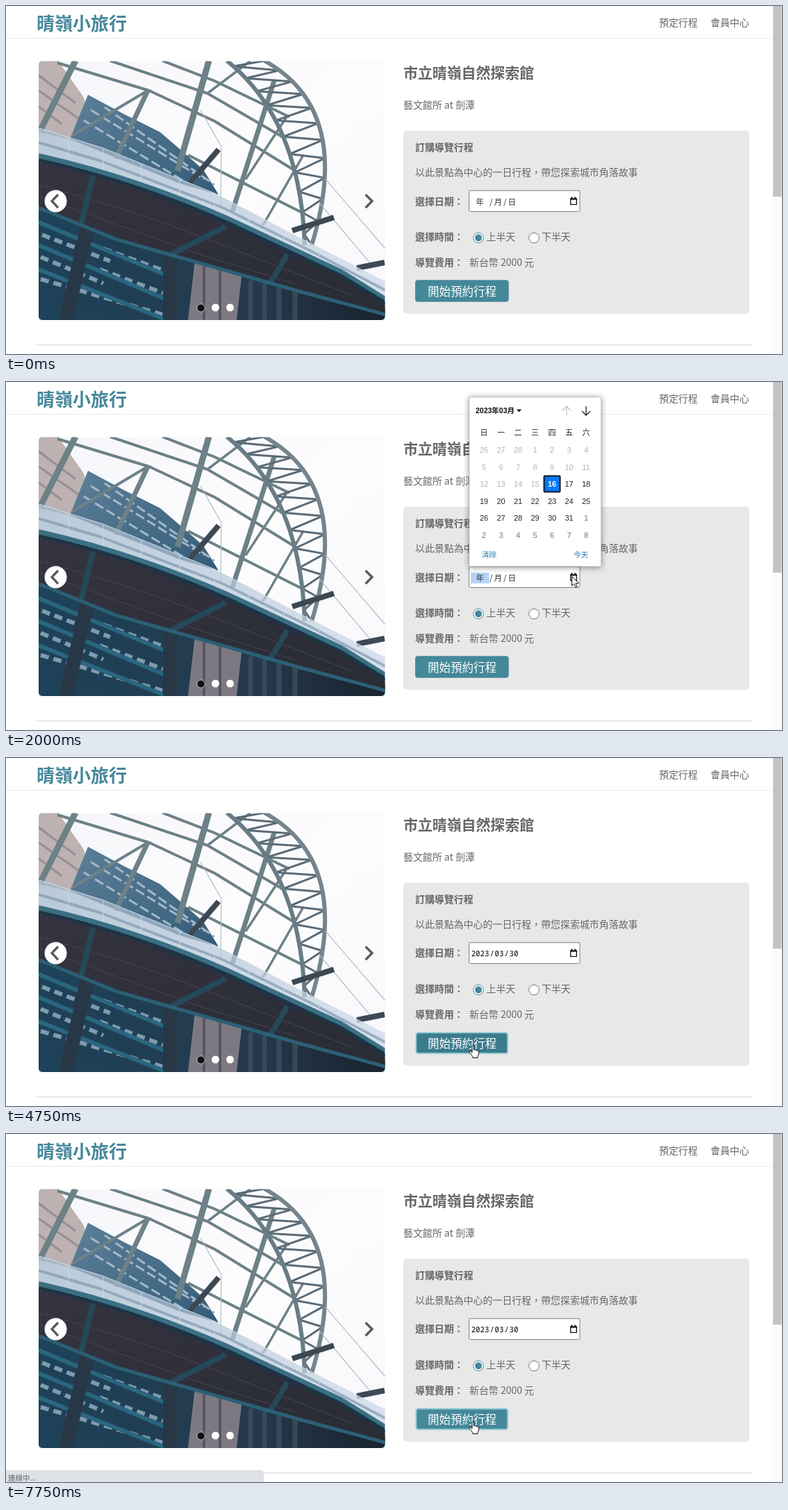
Recreate the animation shown at these times as an HTML page. Size 1117 px wide and 502 px high, loop 8000 ms.

```html
<!DOCTYPE html>
<html lang="zh-Hant">
<head>
<meta charset="utf-8">
<title>晴嶺小旅行</title>
<style>
html,body{margin:0;width:100%;height:100%;overflow:hidden;background:#fff}
svg{display:block;width:1117px;height:502px}
text{font:13.95px "Noto Sans CJK TC","Noto Sans CJK JP","Noto Sans CJK",sans-serif;fill:#666}
.b{font-weight:700}
.mid{text-anchor:middle}
#date text{font-size:11.5px;fill:#333}
#date .mono{font:10.7px "Noto Sans Mono","DejaVu Sans Mono",monospace;fill:#000}
#cal text{font-size:10.5px;fill:#222}
#cal .day{font:11px "Liberation Sans","Noto Sans CJK TC",sans-serif;text-anchor:middle}
#cal .off{fill:#b4b4b4}
#cal .next{fill:#757575}
#cal .today{fill:#fff;font-weight:700}
#cal .link{fill:#2a7ab0}
#cal>rect:first-child{filter:drop-shadow(0 1px 4px rgba(0,0,0,.45))}
#msg>.box{filter:drop-shadow(0 14px 30px rgba(0,0,0,.4))}
.line{fill:none;stroke-linejoin:round}
.tm{animation:8s step-end infinite}
#arrow{animation-name:arrow}
#hand,#hover{animation-name:hand}
#press{animation-name:press}
#ring{animation-name:ring}
#year{animation-name:year}
#empty{animation-name:empty}
#filled{animation-name:filled}
#label{animation-name:label}
#cal{animation-name:cal}
#pick{animation-name:pick}
#msg{animation-name:msg}
#status{animation-name:status}
@keyframes arrow{
0%{opacity:0;transform:translate(759px,220px)}
6.25%{opacity:1;transform:translate(759px,220px)}
12.5%{opacity:1;transform:translate(792px,261px)}
15.625%{opacity:1;transform:translate(812px,279px)}
18.75%{opacity:1;transform:translate(814px,280px)}
31.25%{opacity:1;transform:translate(800px,244px)}
34.375%{opacity:1;transform:translate(784px,205px)}
37.5%{opacity:1;transform:translate(787px,205px)}
46.875%{opacity:1;transform:translate(784px,211px)}
50%{opacity:1;transform:translate(755px,289px)}
53.125%{opacity:1;transform:translate(700px,365px)}
56.25%,100%{opacity:0;transform:translate(700px,365px)}
}
@keyframes hand{0%{opacity:0}56.25%,100%{opacity:1}}
@keyframes press{0%,62.5%,100%{opacity:0}59.375%{opacity:1}}
@keyframes ring{0%,25%,59.375%,100%{opacity:0}21.875%,43.75%{opacity:1}}
@keyframes year{0%,59.375%,100%{opacity:0}21.875%{opacity:1}}
@keyframes empty{0%{opacity:1}43.75%,100%{opacity:0}}
@keyframes filled{0%{opacity:0}43.75%,100%{opacity:1}}
@keyframes label{0%{transform:none}43.75%,100%{transform:translateY(-1px)}}
@keyframes cal{0%,43.75%,100%{opacity:0}25%{opacity:1}}
@keyframes pick{0%{opacity:0}34.375%,100%{opacity:1}}
@keyframes msg{0%,96.875%,100%{opacity:0}65.625%{opacity:1}}
@keyframes status{0%{opacity:0}96.875%,100%{opacity:1}}
</style>
</head>
<body>
<svg viewBox="0 0 1117 502">
<defs>
<clipPath id="frame"><rect x="47" y="79.500" width="498.500" height="373.500" rx="5"/></clipPath>
<linearGradient id="sky" x2="1" y2="1"><stop stop-color="#f6f6fa"/><stop offset=".5" stop-color="#fdfcfd"/><stop offset="1" stop-color="#f8f7fb"/></linearGradient>
<linearGradient id="facade" x2="1" y2="1"><stop stop-color="#5d8098"/><stop offset="1" stop-color="#335c79"/></linearGradient>
<linearGradient id="glass" x2="1" y2=".6"><stop stop-color="#9fb6ca"/><stop offset="1" stop-color="#c9d6e4"/></linearGradient>
<linearGradient id="deck" x2="1" y2=".5"><stop stop-color="#343440"/><stop offset="1" stop-color="#2a2c36"/></linearGradient>
<linearGradient id="low" x2="1"><stop stop-color="#1d425a"/><stop offset=".6" stop-color="#243a4c"/><stop offset="1" stop-color="#1a2230"/></linearGradient>
<linearGradient id="bar"><stop stop-color="#66aabb"/><stop offset="1" stop-color="#337788"/></linearGradient>
</defs>

<text class="b" x="44" y="34.500" style="font-size:26px;fill:#448899">晴嶺小旅行</text>
<text x="940" y="28.700">預定行程</text>
<text x="1014" y="28.700">會員中心</text>
<path d="M0 46.500H1104" stroke="#ececec"/>
<path d="M43 488.800H1075" stroke="#e4e4e4" stroke-width="1.500"/>
<rect x="1104" width="13" height="502" fill="#fbfbfb"/>
<rect x="1104" width="12.500" height="275" fill="#c4c4c4"/>

<g clip-path="url(#frame)">
<rect x="47" y="79" width="499" height="374" fill="url(#sky)"/>
<path d="M47 79H75L112 132 128 200 47 182Z" fill="#bdb2b1"/>
<path d="M47 100L100 140M47 122L108 165M47 145L80 170" stroke="#938f99" stroke-width="3"/>
<path d="M118 128L170 156 222 182 284 236 306 272 250 256 92 192Z" fill="url(#facade)"/>
<path d="M122 150L285 250M112 165L255 252M142 146L300 258" stroke="#a3b8c8" stroke-width="3" stroke-dasharray="14 5"/>
<g class="line" stroke="#6d8187">
<path d="M100 79L50 178M292 79L247 238" stroke-width="9"/>
<path d="M205 120L158 220M386 108L326 296" stroke-width="7"/>
<path d="M204 122L95 187M74 82L206 122 300 166 420 240M150 79L290 126 400 190M225 79L300 108 408 160M262 215L430 300" stroke-width="4"/>
<path d="M352 79L290 126M404 160L345 250M428 215L370 316" stroke-width="3.500"/>
</g>
<path id="truss" class="line" stroke="#5c6b76" stroke-width="3"/>
<path class="line" d="M318 79Q424 165 430 345" stroke="#687c85" stroke-width="6"/>
<path class="line" d="M372 79Q500 150 440 345" stroke="#75848d" stroke-width="6"/>
<path d="M460 250L546 350M452 285L525 372M310 203L309 290M310 203L280 150" class="line" stroke="#b4bac1" stroke-width="1.200"/>
<path d="M306 207L264 256M412 324L472 305M505 378L545 370" stroke="#3b4955" stroke-width="8"/>

<path d="M47 275L546 435V453H47Z" fill="url(#low)"/>
<path d="M52 330L150 368M50 362L140 400M50 394L225 445M140 350L228 382M135 380L226 414" stroke="#7f9cac" stroke-width="6" stroke-dasharray="12 7"/>
<path d="M47 312L235 390M47 345L235 425M47 380L232 453" stroke="#2a6680" stroke-width="6"/>
<path d="M272 365L340 382 332 453H262Z" fill="#7c7982"/>
<path d="M285 373V453M308 378V453" stroke="#565862" stroke-width="4"/>
<path d="M122 300L86 453M236 350V453" stroke="#283846" stroke-width="20"/>
<path d="M352 395V453M372 400V453M393 405V453M416 410V453" stroke="#36495a" stroke-width="7"/>
<path d="M47 224Q200 258 320 313L490 394 546 428V444L420 410 290 372 160 335 47 289Z" fill="url(#deck)"/>
<path d="M47 258Q190 296 310 344L500 418M47 275L290 362 420 402" class="line" stroke="#47464f"/>
<path d="M125 246L108 314M316 318L238 358M405 358L380 400" stroke="#26495a" stroke-width="8"/>
<path d="M47 291L160 337 290 374 420 411 546 445" class="line" stroke="#2b6076" stroke-width="5"/>
<path d="M47 176L140 205 300 270 420 333 546 398V420L480 382 320 306 130 240 47 214Z" fill="url(#glass)" opacity=".72"/>
<path d="M47 197L135 223 310 290 440 354 546 410" class="line" stroke="#7390a8" stroke-width="4" opacity=".6"/>
<path d="M47 176L140 205 300 270 420 333 546 398" class="line" stroke="#d3dee8"/>
<path d="M90 190V226M140 206V242M195 228V262M250 250V282M300 270V300M350 297V322M400 323V345M450 350V368" stroke="#ccd8e2"/>
<path d="M47 216Q185 247 320 307L482 383 546 423" class="line" stroke="#3b6f83" stroke-width="7"/>
<path d="M47 222Q185 253 320 313L482 389 546 428" class="line" stroke="#1b3546" stroke-width="5"/>
</g>
<circle cx="71.500" cy="281.500" r="16" fill="#fff"/>
<path d="M75 272L66 281.500 75 291M517.500 272L527 281.500 517.500 291" fill="none" stroke="#5c5c5c" stroke-width="3.400"/>
<circle cx="280.500" cy="435.500" r="5.700" fill="#111" stroke="#cfd8dc"/>
<circle cx="301.500" cy="435" r="5.500" fill="#fff"/>
<circle cx="322.500" cy="435" r="5.500" fill="#fff"/>

<text class="b" x="572" y="103.500" style="font-size:20.9px">市立晴嶺自然探索館</text>
<text x="572" y="147.700">藝文館所 at 劍潭</text>
<rect x="572" y="180" width="498" height="264" rx="5" fill="#e8e8e8"/>
<text class="b" x="589" y="208.700">訂購導覽行程</text>
<text x="589" y="245">以此景點為中心的一日行程，帶您探索城市角落故事</text>
<text id="label" class="b tm" x="589" y="286.700">選擇日期：</text>
<text class="b" x="589" y="338.300">選擇時間：</text>
<text class="b" x="589" y="375">導覽費用：</text>
<text x="667" y="375">新台幣 2000 元</text>
<circle cx="680" cy="334.500" r="7.300" fill="#fff" stroke="#448899"/>
<circle cx="680" cy="334.500" r="5" fill="#448899"/>
<text x="691.500" y="338.300">上半天</text>
<circle cx="760" cy="334.500" r="7.300" fill="#fff" stroke="#767676"/>
<text x="771" y="338.300">下半天</text>

<g id="date">
<rect x="666.500" y="266.300" width="159.500" height="30.200" rx="2" fill="#fff" stroke="#808080"/>
<rect id="ring" class="tm" x="666.500" y="266.500" width="159.500" height="30" rx="2.500" fill="none" stroke="#101010" stroke-width="2"/>
<rect id="year" class="tm" x="669" y="275" width="26.500" height="15.500" fill="#b3d3fb"/>
<g id="empty" class="tm"><text x="676.500" y="286.500">年</text><text x="696" y="286.500">/</text><text x="702.500" y="286.500">月</text><text x="716" y="286.500">/</text><text x="722.500" y="286.500">日</text></g>
<g id="filled" class="tm"><text class="mono" x="669.700" y="285.800">2023</text><text class="mono" x="696.500" y="285.800">/</text><text class="mono" x="703.500" y="285.800">03</text><text class="mono" x="717.500" y="285.800">/</text><text class="mono" x="724.500" y="285.800">30</text></g>
<path d="M812.700 278V286.400H821.300V278Z" fill="none" stroke="#111" stroke-width="1.300"/>
<path d="M812 278.500H822M814.500 275.500V278M819.500 275.500V278" stroke="#111" stroke-width="2"/>
</g>

<rect x="589" y="395.300" width="134.700" height="31.500" rx="4" fill="#448899"/>
<g id="hover" class="tm"><rect x="588" y="394" width="137" height="34" fill="#e8e8e8"/><rect x="590.500" y="396.500" width="131.500" height="29.500" rx="3" fill="#448899" stroke="#8cc6d4" stroke-width="2"/></g>
<rect id="press" class="tm" x="591.500" y="397.500" width="129.500" height="27.500" rx="2" fill="#3b7c8c"/>
<text x="607" y="417.500" style="font-size:16.500px;fill:#fff;font-weight:350">開始預約行程</text>

<g id="cal" class="tm">
<rect x="667" y="22" width="189.500" height="244" fill="#fff" stroke="#c4c4c4" stroke-width=".8"/>
<text class="b" x="676" y="45" style="font-family:'Liberation Sans','Noto Sans CJK TC',sans-serif;fill:#111">2023年03月</text>
<path d="M735 39.500H742L738.500 43.500Z" fill="#111"/>
<path d="M807 48V35M801 41L807 35 813 41" fill="none" stroke="#bbb" stroke-width="1.200"/>
<path d="M835 35V48M829 42L835 48 841 42" fill="none" stroke="#222" stroke-width="1.300"/>
<rect x="774.500" y="135.500" width="23" height="23" rx="1" fill="#0a78f5" stroke="#101820" stroke-width="2"/>
<rect id="pick" class="tm" x="774.500" y="184.500" width="23" height="23" rx="1" fill="#b3d3fb" stroke="#4e6f98"/>
<g id="days"></g>
<text class="link" x="685" y="252.500">清除</text>
<text class="link" x="817" y="252.500">今天</text>
</g>

<g id="msg" class="tm">
<rect class="box" x="410" y="69" width="297" height="88" rx="5" fill="#fdfdfd"/>
<path d="M410 78V74Q410 69 415 69H702Q707 69 707 74V78Z" fill="url(#bar)"/>
<circle cx="514.500" cy="114.700" r="5.600" fill="#8edb12"/>
<text class="mid b" x="514.500" y="117.300" style="font-size:7px;fill:#5d9a12">V</text>
<text class="b" x="524" y="119.500" style="fill:#8edb12">成功預定行程</text>
</g>

<g id="status" class="tm">
<path d="M0 485H367Q371 485 371 489V502H0Z" fill="#dee1e6"/>
<text x="3" y="499.500" style="font-size:10.500px">連線中...</text>
</g>

<path id="arrow" class="tm" d="M.5 .5V14L3.700 11 6 16.300 8.200 15.300 6 10.300H10.500Z" fill="#fff" stroke="#111" stroke-linejoin="round"/>
<g id="hand" class="tm"><path transform="translate(666 414)" d="M5 11V2Q5 .6 6.200 .6T7.400 2V7Q9.500 6 9.900 7.500 11.600 6.800 12.100 8.200 14.200 7.700 14.400 9.700V13Q14.200 15.500 12.800 16.300V18.500H6V16.800Q3.500 14 1 10.600 .8 8.800 2.600 9Z" fill="#fff" stroke="#111" stroke-linejoin="round"/></g>
</svg>
<script>
const NS = 'http://www.w3.org/2000/svg';
const days = document.getElementById('days');

function cell(label, col, y, kind = '') {
  const t = document.createElementNS(NS, 'text');
  t.setAttribute('x', 688 + col * 24.5);
  t.setAttribute('y', y);
  t.setAttribute('class', 'day ' + kind);
  t.textContent = label;
  days.append(t);
}

[...'日一二三四五六'].forEach((d, i) => cell(d, i, 76.8));
for (let i = 0; i < 42; i++) {
  const n = i - 2;
  const label = n < 1 ? n + 28 : n > 31 ? n - 31 : n;
  const kind = n < 16 ? 'off' : n === 16 ? 'today' : n > 31 ? 'next' : '';
  cell(label, i % 7, 102 + Math.floor(i / 7) * 24.5, kind);
}

// zigzag between the two curved ribs
const mix = (a, b, c, t) => (1 - t) ** 2 * a + 2 * t * (1 - t) * b + t * t * c;
let zig = '';
for (let i = 0; i <= 22; i++) {
  const t = i / 22;
  const [x, y] = i % 2
    ? [mix(318, 424, 430, t), mix(79, 165, 345, t)]
    : [mix(372, 500, 440, t), mix(79, 150, 345, t)];
  zig += (i ? 'L' : 'M') + x.toFixed(1) + ' ' + y.toFixed(1);
}
document.getElementById('truss').setAttribute('d', zig);
</script>
</body>
</html>
```
